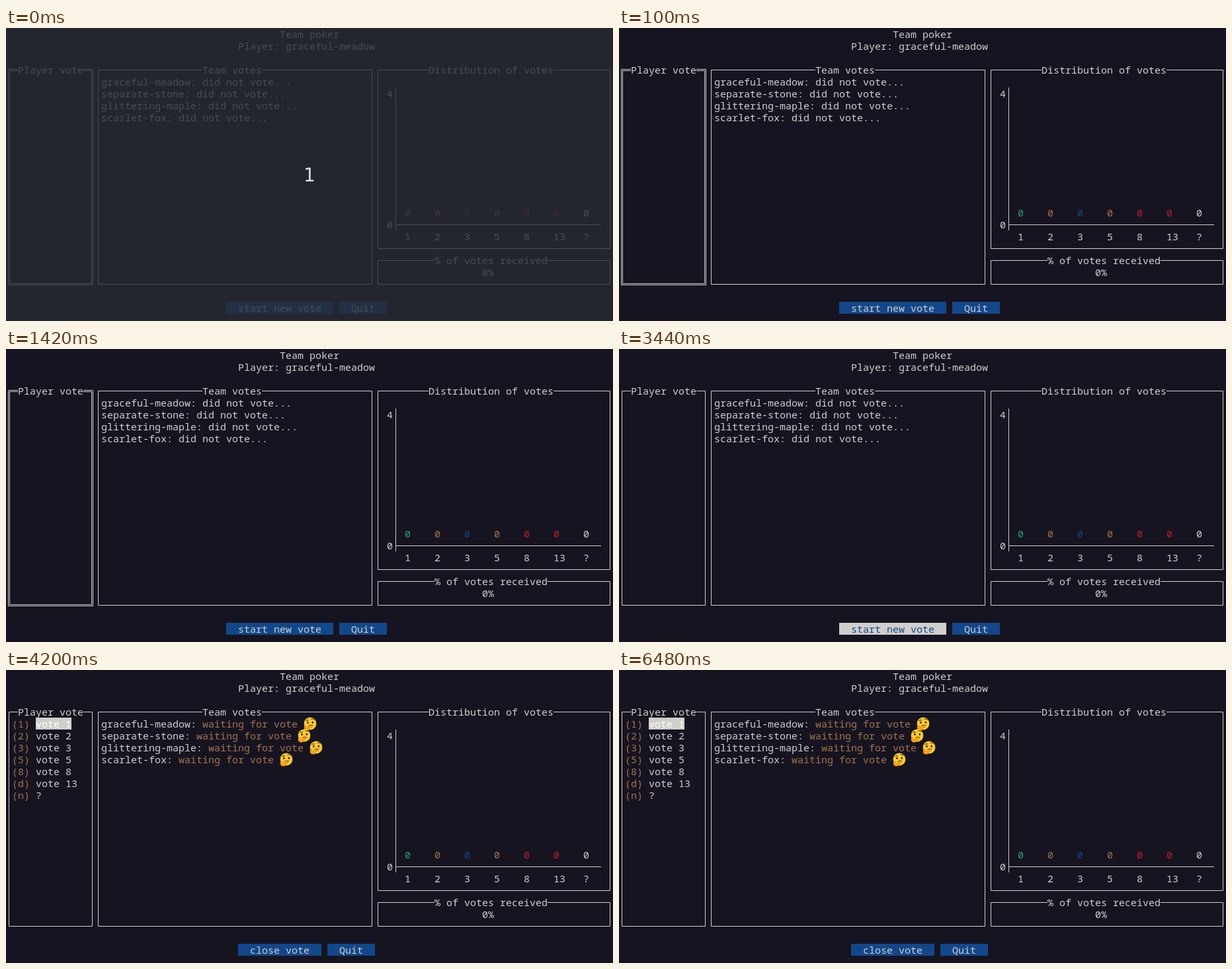
Write an HTML page that moves like this. It is 918 px wide and 443 px high and loops after 8000 ms.

```html
<!DOCTYPE html>
<html lang="en">
<head>
<meta charset="utf-8">
<title>Team poker</title>
<style>
  html, body { margin: 0; height: 100%; overflow: hidden; background: #171421; }
  svg { display: block; }
  text { font: 15px "Noto Sans Mono", "DejaVu Sans Mono", monospace; white-space: pre; }
  .line { fill: none; stroke: #d0cfcc; }
  .count { font: 28px "DejaVu Sans", sans-serif; }
</style>
</head>
<body>
<svg id="stage" width="918" height="443" viewBox="0 0 918 443">
  <defs>
    <g id="thinking">
      <circle r="9.4" fill="#fcc934"/>
      <path d="M-6.5-4.2Q-4.5-6-2-4.8M1.5-6.4Q4.5-8.2 6.6-5.4" fill="none" stroke="#6d4c2f" stroke-width="1.3"/>
      <ellipse cx="-3.6" cy="-1.6" rx="1.3" ry="1.7" fill="#422b1c"/>
      <ellipse cx="3.8" cy="-1.8" rx="1.3" ry="1.7" fill="#422b1c"/>
      <path d="M-2.5 3.4Q1 1.8 4.2 3" fill="none" stroke="#59351c" stroke-width="1.2"/>
      <path d="M-8.6 3.2Q-7.4 2-6.5 4L-5.6 6L2 4.4Q3.8 4.6 2.6 6L-1 7.2Q0 9.6-3.6 10.2Q-8.6 10.6-9 6.4Z" fill="#f6a51f" stroke="#d98218" stroke-width=".6"/>
    </g>
  </defs>
</svg>
<script>
const W = 9, H = 18, LOOP = 8000;
const WHITE = '#d0cfcc', BLUE = '#12488b', BROWN = '#a2734c', RED = '#c01c28', GREEN = '#26a269';
const PLAYERS = ['graceful-meadow', 'separate-stone', 'glittering-maple', 'scarlet-fox'];
const VOTES = ['1', '2', '3', '5', '8', '13', '?'];
const COUNT_COLORS = [GREEN, BROWN, BLUE, BROWN, RED, RED, WHITE];
const stage = document.getElementById('stage');

function add(parent, tag, attrs = {}, content = '') {
  const el = document.createElementNS('http://www.w3.org/2000/svg', tag);
  for (const key in attrs) el.setAttribute(key, attrs[key]);
  el.textContent = content;
  return parent.appendChild(el);
}

// Positions are terminal cells: column and row.
const write = (parent, col, row, content, fill = WHITE) =>
  add(parent, 'text', { x: col * W, y: row * H + 15, fill }, content);

const block = (parent, col, row, cols, fill) =>
  add(parent, 'rect', { x: col * W, y: row * H, width: cols * W, height: H, fill });

const line = (parent, d) => add(parent, 'path', { class: 'line', d });

function box(parent, left, top, right, bottom, title, titleCol, double) {
  const end = titleCol + title.length;
  for (const grow of double ? [-1, 1] : [0]) {
    const x1 = left * W + 4.5 - grow, x2 = right * W + 4.5 + grow;
    const y1 = top * H + 9.5 - grow, y2 = bottom * H + 9.5 + grow;
    line(parent, `M${titleCol * W} ${y1}H${x1}V${y2}H${x2}V${y1}H${end * W}`);
  }
  write(parent, titleCol, top, title);
}

function button(parent, col, label, focused) {
  block(parent, col, 23, label.length + 4, focused ? WHITE : BLUE);
  write(parent, col + 2, 23, label, focused ? BLUE : WHITE);
}

function drawCommon(g) {
  write(g, 46, 0, 'Team poker');
  write(g, 39, 1, 'Player: ' + PLAYERS[0]);
  box(g, 15, 3, 61, 21, 'Team votes', 33);
  PLAYERS.forEach((name, i) => write(g, 16, 4 + i, name + ':'));
  box(g, 62, 3, 101, 18, 'Distribution of votes', 71);
  line(g, 'M589.5 90V306M589.5 297.5H900');
  write(g, 64, 5, '4');
  write(g, 64, 16, '0');
  VOTES.forEach((vote, i) => {
    write(g, 67 + 5 * i, 15, '0', COUNT_COLORS[i]);
    write(g, 67 + 5 * i, 17, vote);
  });
  box(g, 62, 19, 101, 21, '% of votes received', 72);
  write(g, 80, 20, '0%');
}

function drawIdle(g, buttonFocused) {
  box(g, 0, 3, 14, 21, 'Player vote', 2, !buttonFocused);
  PLAYERS.forEach((name, i) => write(g, 18 + name.length, 4 + i, 'did not vote...'));
  button(g, 37, 'start new vote', buttonFocused);
  button(g, 56, 'Quit');
}

function drawVoting(g) {
  box(g, 0, 3, 14, 21, 'Player vote', 2);
  block(g, 5, 4, 6, WHITE);
  VOTES.forEach((vote, i) => {
    write(g, 1, 4 + i, `(${'12358dn'[i]})`, BROWN);
    write(g, 5, 4 + i, vote === '?' ? vote : 'vote ' + vote, i ? WHITE : '#fff');
  });
  PLAYERS.forEach((name, i) => {
    const col = 18 + name.length;
    write(g, col, 4 + i, 'waiting for vote', BROWN);
    add(g, 'use', { href: '#thinking', transform: `translate(${(col + 17) * W + 10} ${(4 + i) * H + 9})` });
  });
  button(g, 39, 'close vote');
  button(g, 54, 'Quit');
}

drawCommon(add(stage, 'g'));
const idle = add(stage, 'g'), ready = add(stage, 'g'), voting = add(stage, 'g');
drawIdle(idle, false);
drawIdle(ready, true);
drawVoting(voting);

const overlay = add(stage, 'g');
add(overlay, 'rect', { width: 918, height: 443, fill: '#272b33', opacity: 0.8 });
add(overlay, 'text', { class: 'count', x: 459, y: 232, fill: '#ddd', 'text-anchor': 'middle' }, '1');

const show = (el, on) => el.setAttribute('visibility', on ? 'visible' : 'hidden');

function render() {
  const t = performance.now() % LOOP;
  show(overlay, t < 100);
  show(idle, t < 2300);
  show(ready, t >= 2300 && t < 4200);
  show(voting, t >= 4200);
  requestAnimationFrame(render);
}
render();
</script>
</body>
</html>
```
